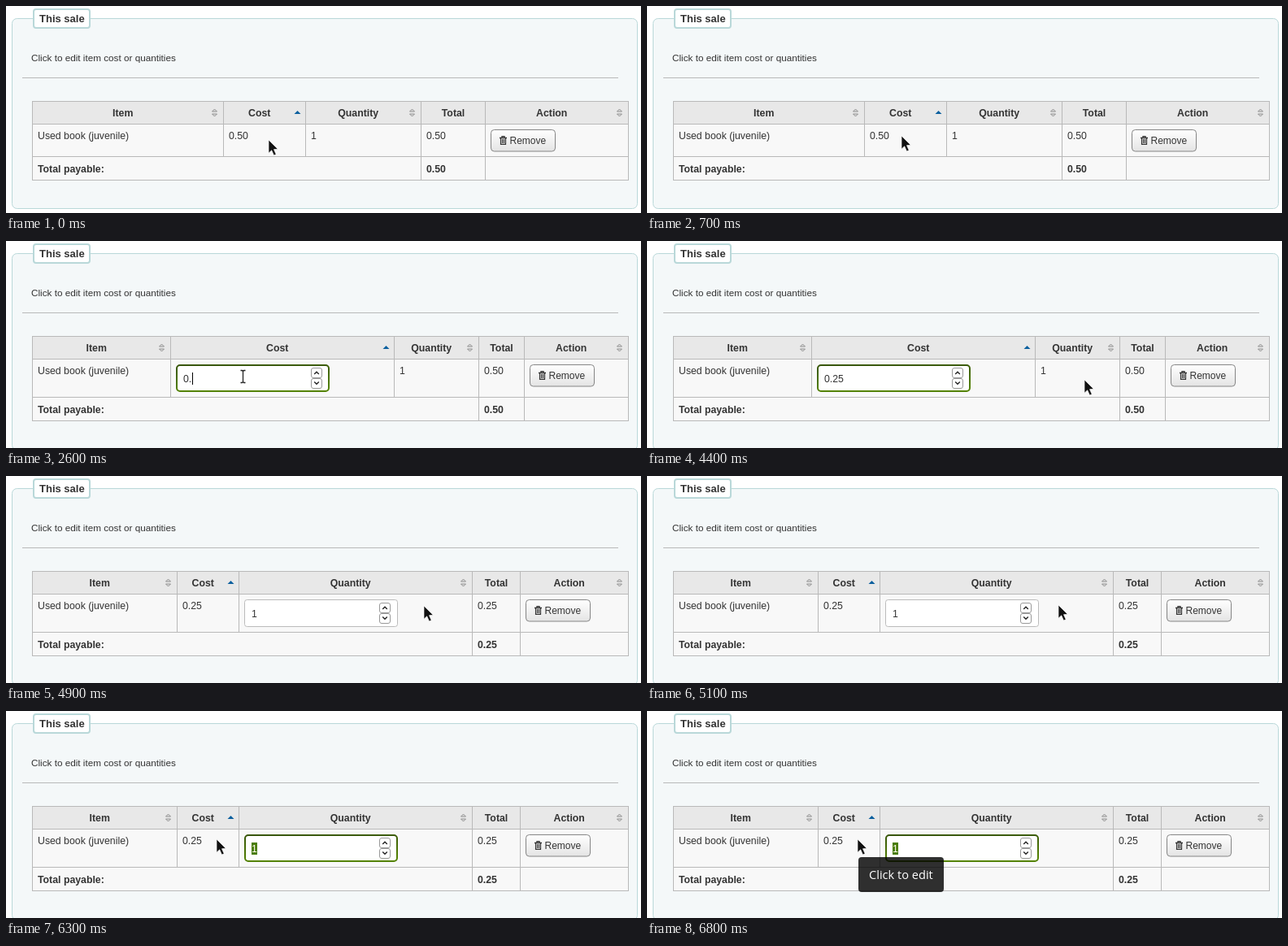
These frames come from a looping animation (781x255 px, 8 s). An HTML page:

```html
<!DOCTYPE html>
<html lang="en">
<head>
<meta charset="utf-8">
<title>Edit sale</title>
<style>
  html, body { margin: 0; width: 100%; height: 100%; overflow: hidden; background: #fff; }
  svg { display: block; }
  text { font: 12.3px "Liberation Sans", Arial, sans-serif; fill: #333; white-space: pre; }
  .b { font-weight: bold; }
  .legend { font-size: 13px; }
  .hint { font-size: 11.73px; }
  .btn { font-size: 12px; }
  .mid { text-anchor: middle; }
  .tip { font: 14.6px "Open Sans", "Noto Sans", sans-serif; fill: #fff; }
  .grid { fill: none; stroke: #b9b9b9; }
</style>
</head>
<body>
<svg width="781" height="255" viewBox="0 0 781 255">
  <defs>
    <linearGradient id="face" x2="0" y2="1">
      <stop offset="0" stop-color="#fff"/><stop offset="1" stop-color="#e4e4e4"/>
    </linearGradient>
    <linearGradient id="ring" x2="0.15" y2="1">
      <stop offset="0" stop-color="#38560a"/><stop offset="1" stop-color="#538200"/>
    </linearGradient>
    <g id="sort" fill="#ddd" stroke="#8a8a8a" stroke-width=".9">
      <path d="M-3 -1.5L0 -4.5L3 -1.5Z"/><path d="M-3 1.5L0 4.5L3 1.5Z"/>
    </g>
    <path id="asc" d="M-4 1.5L0 -2.5L4 1.5Z" fill="#0b5f9e"/>
    <g id="trash" fill="none" stroke="#333">
      <path d="M0 2.5H9M3 2V.7H6V2" stroke-width="1.3"/>
      <path d="M1.5 3V10.4H7.5V3M3.5 4V9M5.5 4V9" stroke-width="1.2"/>
    </g>
    <g id="spin" fill="#fff" stroke="#999">
      <rect x=".5" y="4.5" width="13" height="12" rx="2.5"/>
      <rect x=".5" y="17.5" width="13" height="12" rx="2.5"/>
      <path d="M4.2 12L7 9.3L9.8 12M4.2 21.5L7 24.2L9.8 21.5" fill="none" stroke="#222" stroke-width="1.4"/>
    </g>
    <path id="arrow" d="M0 0V16.2L3.7 12.8L6.5 19L9.2 17.7L6.5 11.7L11.3 11.3Z"
      fill="#111" stroke="#fff" stroke-width=".8" stroke-opacity=".8"/>
    <g id="beam" fill="none">
      <path d="M-3 -7.5H-1L0 -6.5L1 -7.5H3M0 -6.5V6.5M-3 7.5H-1L0 6.5L1 7.5H3" stroke="#fff" stroke-width="2.6"/>
      <path d="M-3 -7.5H-1L0 -6.5L1 -7.5H3M0 -6.5V6.5M-3 7.5H-1L0 6.5L1 7.5H3" stroke="#222" stroke-width="1.3"/>
    </g>
  </defs>
  <g id="view"></g>
  <use id="mouse"/>
</svg>
<script>
const LOOP = 8000;
const HEADS = ['Item', 'Cost', 'Quantity', 'Total', 'Action'];
const view = document.getElementById('view');
const mouse = document.getElementById('mouse');

// column edges, row edges, bottom of the panel, column being edited
const layouts = {
  idle: { cols: [32.5, 267.5, 368.5, 510.5, 589.5, 765.5], rows: [117.5, 145.5, 185.5, 214.5], end: 249.5, edit: 0 },
  cost: { cols: [32.5, 202.5, 477.5, 581.5, 637.5, 765.5], rows: [117.5, 145.5, 192.5, 221.5], end: 257.5, edit: 1 },
  qty:  { cols: [32.5, 210.5, 286.5, 573.5, 632.5, 765.5], rows: [117.5, 145.5, 192.5, 221.5], end: 257.5, edit: 2 }
};

// time, layout, price, field value, caret offset (0 = hidden), focused
const states = [
  [0, 'idle', '0.50', '', 0, false],
  [1200, 'cost', '0.50', '0.50', 33, true],
  [2300, 'cost', '0.50', '0.50', 0, true],
  [2500, 'cost', '0.50', '0.5', 27, true],
  [2600, 'cost', '0.50', '0.', 20, true],
  [3300, 'cost', '0.50', '0.2', 27, true],
  [3500, 'cost', '0.50', '0.25', 33, true],
  [3600, 'cost', '0.50', '0.25', 0, true],
  [4900, 'qty', '0.25', '1', 0, false],
  [5200, 'qty', '0.25', '1', 0, true]
];

// time, pointer shape, position
const moves = [
  [0, 'arrow', 323, 165], [400, 'arrow', 321, 164], [500, 'arrow', 317, 162],
  [600, 'arrow', 314, 161], [700, 'arrow', 313, 160],
  [1200, 'beam', 313, 160], [1500, 'beam', 311, 161], [1600, 'beam', 304, 165],
  [1700, 'beam', 297, 169], [1800, 'beam', 292, 171], [1900, 'beam', 291.5, 167],
  [4200, 'arrow', 383, 168], [4400, 'arrow', 538, 171], [4500, 'arrow', 557, 172],
  [4600, 'arrow', 547, 167], [4700, 'arrow', 528, 161], [4900, 'arrow', 514, 160],
  [5000, 'arrow', 508, 160], [5100, 'arrow', 506, 159], [5200, 'arrow', 488, 160],
  [5300, 'beam', 450, 162], [5400, 'beam', 405, 164], [5500, 'beam', 368, 168],
  [5600, 'beam', 348, 170], [5800, 'beam', 302, 163], [5900, 'arrow', 257, 150],
  [6100, 'arrow', 260, 159], [6300, 'arrow', 259, 158]
];
const TIP_AT = 6800;

const text = (x, y, s, cls = '') => `<text x="${x}" y="${y}" class="${cls}">${s}</text>`;
const rect = (x, y, w, h, fill, more = '') =>
  `<rect x="${x}" y="${y}" width="${w}" height="${h}" fill="${fill}" ${more}/>`;
const use = (id, x, y) => `<use href="#${id}" x="${x}" y="${y}"/>`;

function panel(end) {
  return rect(7.5, 15.5, 769, end - 15.5, '#f4f8f9', 'rx="6" stroke="#b9d8d9"') +
    rect(34, 4, 69, 23, '#fff', 'rx="3" stroke="#b9d8d9" stroke-width="2"') +
    text(41, 20, 'This sale', 'b legend') +
    text(31, 68, 'Click to edit item cost or quantities', 'hint') +
    '<path class="grid" d="M20 88.5H753"/>';
}

function field(x, value, caret, focus) {
  const box = focus
    ? rect(x + 1, 153, 187, 32, '#fff', 'rx="4" stroke="url(#ring)" stroke-width="2"')
    : rect(x + .5, 152.5, 188, 33, '#fff', 'rx="3" stroke="#bbb"');
  const marked = focus && value === '1';
  return box + use('spin', x + 166, 152) +
    (marked ? rect(x + 9, 162, 7, 15, '#4a7d00') : '') +
    `<text x="${x + 9}" y="174"${marked ? ' style="fill:#fff"' : ''}>${value}</text>` +
    (caret ? rect(x + caret, 162, 1, 15, '#000') : '');
}

function button(x) {
  return rect(x + .5, 152.5, 79, 26.5, 'url(#face)', 'rx="4" stroke="#858585"') +
    use('trash', x + 11, 160) + text(x + 23.5, 170, 'Remove', 'btn');
}

function table({ cols, rows, edit }, price, value, caret, focus) {
  const [top, body, foot, end] = rows;
  const [left, , , total, action, right] = cols;
  let out = rect(left, top, right - left, body - top, '#e8e8e8') +
    rect(left, body, right - left, end - body, '#f8f8f8');

  out += `<path class="grid" d="${rows.map(y => `M${left - .5} ${y}H${right + .5}`).join('')}` +
    cols.map(x => `M${x} ${top}V${[left, total, action, right].includes(x) ? end : foot}`).join('') + '"/>';

  HEADS.forEach((name, i) => {
    const mid = (cols[i] + cols[i + 1]) / 2;
    const sortable = name !== 'Total';
    out += text(mid - (sortable ? 6.3 : 0), 136, name, 'b mid');
    if (sortable) out += use(name === 'Cost' ? 'asc' : 'sort', cols[i + 1] - (name === 'Cost' ? 10 : 11), 131.5);
  });

  ['Used book (juvenile)', price, '1', price].forEach((s, i) => {
    out += edit && i === edit
      ? field(cols[i] + 6.5, value, caret, focus)
      : text(cols[i] + 6.5, 164, s);
  });
  return out + button(Math.round(action + 6.6)) +
    text(left + 6.5, foot + 19, 'Total payable:', 'b') +
    text(total + 6.5, foot + 19, price, 'b');
}

const tooltip = () => rect(260, 180, 105, 43, '#000', 'rx="4" fill-opacity=".81"') +
  text(273, 207, 'Click to edit', 'tip');

const at = (list, t) => list.findLast(step => step[0] <= t);

let shown = '';
function draw() {
  const t = performance.now() % LOOP;
  const [start, name, ...cells] = at(states, t);
  const tip = t >= TIP_AT;
  const key = start + ':' + tip;
  if (key !== shown) {
    shown = key;
    const layout = layouts[name];
    view.innerHTML = panel(layout.end) + table(layout, ...cells) + (tip ? tooltip() : '');
  }
  const [, shape, x, y] = at(moves, t);
  mouse.setAttribute('href', '#' + shape);
  mouse.setAttribute('transform', `translate(${x} ${y})`);
  requestAnimationFrame(draw);
}
draw();
</script>
</body>
</html>
```
